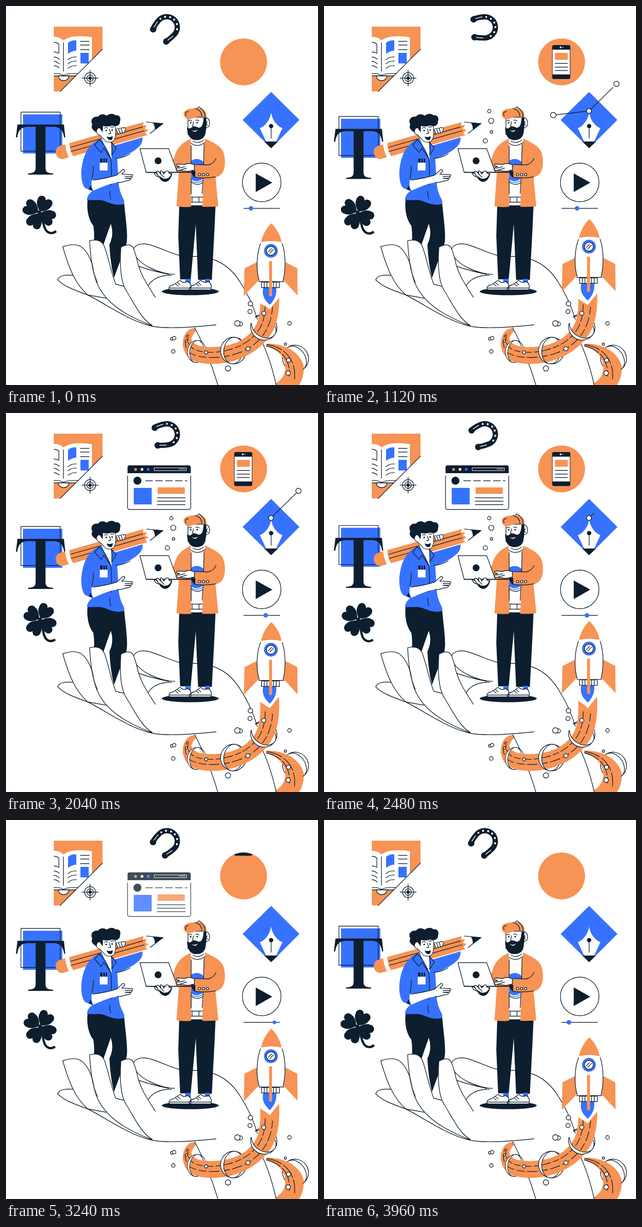
These frames come from a looping animation (679 px wide and 825 px high, 4000 ms). An HTML page:

```html
<!DOCTYPE html>
<html lang="en">
<head>
<meta charset="utf-8">
<title>Creative team</title>
<style>
html,body{margin:0;width:100%;height:100%;overflow:hidden;background:#fff}
svg{display:block;width:679px;height:825px}
.o{fill:#f79354}.b{fill:#3772ff}.n{fill:#0d1e2e}.w{fill:#fff}
.l{fill:none}
.s,.l{stroke:#0d1e2e;stroke-width:1.4;stroke-linecap:round;stroke-linejoin:round}
.r{stroke:#fff;fill:none}
.grow{transform-box:fill-box;transform-origin:center}
</style>
</head>
<body>
<svg viewBox="0 0 679 825">
<defs>
  <clipPath id="disc"><circle cx="517" cy="121.7" r="51"/></clipPath>
  <clipPath id="page"><path d="M104 45H210V94L118 186H104Z"/></clipPath>
  <path id="leaf" d="M0-2C-6-7-16-13-16.500-23A8.500 9 0 0 1 0-30A8.500 9 0 0 1 16.500-23C16-13 6-7 0-2Z"/>
  <path id="band" class="w s" d="M0-29A28 29 0 0 0 0 29A21 29 0 0 1 0-29Z"/>
</defs>

<!-- book -->
<g clip-path="url(#page)">
  <path class="o" d="M104 45H210V94L118 186H104Z"/>
  <path class="w" d="M104 67Q117 67 125 75Q143 61 187 68V152H104Z"/>
  <path class="b" d="M135 80Q143 74 153 75V97Q143 98 135 104ZM162 102H180V125H162Z"/>
  <path class="l" d="M125 80V142M104 79Q111 79 115 83V103Q110 100 104 100M104 111Q111 111 116 116M104 120Q111 121 116 126M104 130Q111 130 116 135M135 117Q142 110 153 111M135 126Q142 119 153 120M135 136Q142 129 153 130M162 77H181M162 85H181M162 95H181M104 147Q117 146 125 151Q133 146 158 147"/>
  <path class="w s" d="M114 152A11.500 10.500 0 0 0 137 152Z"/>
  <path class="l" d="M104 152H156"/>
</g>
<path class="l" d="M210 94L118 186M165.500 157H200.500M183 139.500V174.500"/>
<circle class="l" cx="183" cy="157" r="12"/><circle class="l" cx="183" cy="157" r="7"/><circle class="n" cx="183" cy="157" r="3.500"/>

<!-- horseshoe -->
<g id="shoe">
  <path class="l" style="stroke-width:11.500" d="M327 27C337 24 343 23.500 350 23.500A23 23 0 0 1 350 69.500C343 69.500 337 69 327 67"/>
  <circle class="n" cx="326.500" cy="28" r="7"/><circle class="n" cx="326.500" cy="67" r="7"/>
  <path class="r" stroke-width="1.500" stroke-linecap="round" d="M331 26L345 23.500M331 67.500L345 69.500"/>
  <g class="w"><circle cx="354" cy="24" r="2"/><circle cx="364" cy="28.500" r="2.200"/><circle cx="371" cy="37" r="2.200"/><circle cx="373" cy="47" r="2.200"/><circle cx="370" cy="58" r="2.200"/><circle cx="362" cy="66" r="2.200"/></g>
</g>

<!-- phone -->
<circle class="o" cx="517" cy="121.700" r="51"/>
<g clip-path="url(#disc)"><g id="phone">
  <rect class="n" x="496.500" y="85" width="39.500" height="74" rx="4"/>
  <path class="w" d="M497.500 95H535V149H497.500Z"/>
  <path class="o" d="M502.500 102H530.500V117H502.500Z"/>
  <path class="l" d="M503 125H530M503 133H530M503 140.500H530"/>
  <circle class="w" cx="515" cy="90" r="2"/><circle class="w" cx="520" cy="90" r="1"/>
</g></g>

<!-- pen tool -->
<path class="b" d="M577 187L638.500 248L577 309.500L515 248Z"/>
<path class="w" d="M577 232C574 250 563 262 552.500 266L566 295H588L601.500 266C591 262 580 250 577 232Z"/>
<path class="n" d="M562 295H592L577 309.500Z"/>
<path class="l" d="M577 262V288"/><circle class="n" cx="577" cy="261.500" r="4.700"/>
<path class="l" id="lineL"/><path class="l" id="lineR"/>
<circle class="w s grow" id="knobL" cx="499" cy="237.500" r="6"/>
<circle class="w s grow" id="knobR" cx="636.500" cy="169.500" r="5.800"/>
<circle class="w s grow" id="anchor" cx="576.700" cy="228.500" r="5.200"/>

<!-- player -->
<circle class="w s" cx="556.500" cy="384" r="42"/>
<path class="n" d="M543.500 364.500V405L579.500 384.500Z"/>
<path class="l" d="M517.500 440.500H595.500"/>
<circle class="b grow" id="dot" cy="440.500" r="5"/>

<!-- clover -->
<g id="clover">
  <g class="n" transform="translate(72.500 449.500) rotate(28)"><use href="#leaf"/><use href="#leaf" transform="rotate(90)"/><use href="#leaf" transform="rotate(180)"/><use href="#leaf" transform="rotate(270)"/><circle r="4"/></g>
  <path class="l" style="stroke-width:5;stroke-linecap:butt" d="M73 450C80 464 81 475 84 482C89 496 101 497 109 490"/>
</g>

<!-- letter -->
<g id="letter">
  <path class="b" d="M37 236H122.500V321H37Z"/>
  <path class="l" d="M32.500 231H118V316H32.500Z"/>
  <path class="n" d="M25 258H126L129 286H126.500C124 269 117 263 102 263H86V352C86 361 90 364 102.500 364.500V367H48V364.500C60 364 64.500 361 64.500 352V263H49C34 263 27 269 24.500 286H21.500Z"/>
</g>

<!-- browser -->
<g id="browser">
  <path class="w s" d="M264.500 137V205Q264.500 210 269 210H397Q402 210 402 205V137"/>
  <path class="n" d="M264.500 131V118Q264.500 114 269 114H397Q402 114 402 118V131Z"/>
  <circle class="o" cx="282" cy="122.700" r="3"/><circle class="w" cx="296" cy="122.700" r="3"/><circle class="b" cx="309.500" cy="122.700" r="3"/>
  <path class="r" d="M322.500 119.500H392.500V125.500H322.500ZM376 122H390"/>
  <circle class="n" cx="286" cy="147.300" r="8.700"/>
  <path class="l" d="M304 147.500H394" stroke-dasharray="15 6.500"/>
  <path class="l" d="M329 184.500H390M329 192H390M329 199.500H390"/>
  <path class="b" d="M278 163H317V199H278Z"/><path class="o" d="M330 162H389V176H330Z"/>
</g>
<g class="w s" id="thoughts"><circle class="grow" cx="351" cy="293.500" r="4.700"/><circle class="grow" cx="364.500" cy="274" r="2.800"/><circle class="grow" cx="364" cy="250" r="5.600"/><circle class="grow" cx="359.700" cy="229" r="3.700"/></g>

<!-- trail, rings and arm -->
<use href="#band" transform="translate(630 767) rotate(-35)"/>
<path class="o" d="M566 735C602 734 640 750 648 785Q649 808 638 825H580C603 815 612 797 606 774C601 757 585 745 566 741Z"/>
<path class="l" d="M568 737C602 742 632 765 628 812M567 740C600 748 619 770 617 806" stroke-dasharray="34 5"/>
<use href="#band" transform="translate(630 767) rotate(145)"/>
<path class="o" d="M414 701C393 700 383 719 385 742L402 748C400 728 404 715 416 705Z"/>
<path class="w" d="M410 699Q440 755 461 825H588Q577 775 559 735L545 690L500 640Z"/>
<path class="l" d="M410 699Q440 755 461 825M559 735Q577 775 588 825"/>
<use href="#band" transform="translate(415 752) rotate(188) scale(.72 .83)"/>
<use href="#band" transform="translate(495 750) rotate(188)"/>
<use href="#band" transform="translate(561 699) rotate(125)"/>
<path class="o" d="M553 621L574 643L594 617C596 650 594 687 577 714C550 755 502 778 453 779C407 780 385 765 385 733L403 723Q406 739 433 742C485 745 519 730 539 703C555 681 554 650 553 621Z"/>
<path class="l" stroke-dasharray="19 5 13 6" d="M564 650C564 690 550 716 518 735C480 757 430 758 409 747C396 740 393 725 398 713"/>
<path class="l" stroke-dasharray="16 7 22 6" d="M580 655C578 694 560 726 528 745C490 768 430 771 402 756C390 748 387 730 394 716"/>
<use href="#band" transform="translate(415 752) rotate(8) scale(.72 .83)"/>
<use href="#band" transform="translate(495 750) rotate(8)"/>
<use href="#band" transform="translate(561 699) rotate(-55)"/>

<!-- palm -->
<path class="w" d="M277 530C282 517 299 515 317 521C345 530 365 542 388 545C440 543 478 553 507 597Q534 638 545 690L457 694C400 703 350 704 318 697L178 630L145 590Z"/>
<path class="l" d="M367 584C339 584 281 564 277 530C282 517 299 515 317 521C345 530 365 542 388 545C440 543 478 553 507 597C525 624 538 652 547 682M309 609Q323 586 360 586M287 566Q318 577 354 584"/>
<ellipse class="n" cx="401" cy="621.500" rx="62" ry="8"/>

<!-- back fingers -->
<path class="w s" d="M178 629C145 617 126 610 112.500 596C116 586 130 585 146 586"/>
<path class="w s" d="M198 600C190 570 184 540 165 525C153 517 139 519 123.500 524C131 550 139 572 146 586Q158 611 178 629L240 640Z"/>

<!-- woman -->
<path class="n" d="M178 418C174 448 182 469 190 478Q193 495 191 520H212L228 474Q236 497 225 519Q227 560 235 592L262 518C266 500 261 470 257 428Z"/>
<path class="b" d="M228 306L297 286Q299 300 284 311C268 323 255 328 240 333Z"/>
<g transform="translate(108 322) rotate(-15.800)">
  <path class="o" d="M26-14.500H15C-4-14-4 15 15 15H26Q23 0 26-14.500ZM35-14.500H203L200-8L209-6L202 0L209 5L200 9L204 15H35Q31 0 35-14.500Z"/>
  <path class="w" d="M26-14.500H35Q31 0 35 15H26Q23 0 26-14.500ZM203-14.500L243 0L204 15L200 9L209 5L202 0L209-6L200-8Z"/>
  <path class="l" d="M36-5H198M34 4H199M209-13L243 0L210 13"/>
  <path class="n" d="M222-7.500L243 0L222 8Q225 0 222-7.500Z"/>
</g>
<path class="b" d="M202 291C178 302 167 326 164 359Q163 386 172 396L188 403Q177 410 176 422C190 424 202 420 213 424S240 436 256 431Q259 429 256 421Q245 402 245 380L242 332C249 325 245 310 232 302L214 289Z"/>
<path class="w" d="M207 285L213 300L230 333L229 300L224 284Z"/>
<path class="b s" d="M203 291L193 303L207 319L213 309L228 332Q218 305 203 291ZM229 296L240 309L230 325Q232 307 229 296Z"/>
<path class="l" d="M228 334Q231 355 228 390M226 403Q225 410 228 420M190 348Q190 364 187 377M239 332Q257 330 270 322"/>
<path class="w" d="M204 341H221V358H204ZM187 378C205 378 225 372 243 367L245 384C224 386 210 394 190 402Q184 392 187 378Z"/>
<path class="n" d="M205 332H210V341H205ZM212 332H215V341H212ZM217 332H220V341H217ZM184 391L188 402L180 399Z"/>
<path class="w s" d="M189 379Q220 375 241 368L254 356Q260 356 258 360L252 366L274 367Q278 369 274 371L259 371H273Q276 374 272 375H259L270 376Q272 379 268 380L260 381Q251 385 242 384"/>
<path class="w s" style="stroke-width:1.200" d="M210 260L237 258Q241 280 236 291Q230 299 217 295L213 290L204 281Q194 277 198 267Q203 261 210 270Z"/>
<path class="n" d="M197 275C188 270 184 264 188 258C182 248 190 239 200 241C206 233 216 236 219 239C227 232 236 235 238 238C247 236 251 244 248 251C249 260 239 264 231 260Q222 264 211 261L210 275L204 266Q198 265 197 275Z"/>
<g class="n"><circle cx="218" cy="271" r="1.800"/><circle cx="231" cy="270" r="1.800"/><path d="M219 284Q227 287 232 283Q233 292 227 292Q221 291 219 284Z"/></g>
<path class="l" d="M214 266Q218 263 221 266M228 264Q231 262 234 264M225 268L228 277L223 278"/>
<path class="w s" style="stroke-width:1.200" d="M240 268Q243 265 245 268Q249 264 251 267Q254 262 256 266Q260 263 260 267L258 275Q256 277 254 275Q252 279 249 276Q246 280 243 277Z"/>
<path class="l" d="M245 268L248 276M251 267L253 275"/>

<!-- front fingers -->
<path class="w" d="M182 511Q206 505 214 523C224 550 229 582 240 606L254 610C249 580 247 550 250 525Q270 514 277 527C291 562 284 570 309 610L325 635L330 690L318 697L240 664Q200 620 190 570Z"/>
<path class="l" d="M240 606L256 610M325 634C308 607 296 591 287 561Q283 541 277 527Q270 514 250 525C247 570 250 602 262 620C281 651 296 683 318 695M239 606C229 582 224 550 214 523Q206 505 182 511C184 550 188 577 197 601C215 646 260 674 318 696M178 629C220 650 268 686 318 697C350 704 410 699 457 694"/>

<!-- man -->
<path class="n" d="M377 434H456L454 480L448 596H418L413 475L402 595H379L375 500Z"/>
<path class="b" d="M390 594H402V604H390ZM433 594H444V604H433Z"/>
<path class="w s" d="M355 617Q353 609 364 607L379 597Q386 605 395 600Q405 603 402 618H358ZM399 617Q398 610 410 607L424 597Q430 604 440 600Q449 604 446 618H403Z"/>
<path class="l" d="M356 614H402M400 614H446M373 602L379 607M369 605L375 610M418 602L424 607M414 605L420 610"/>
<path class="w" d="M402 288H434L430 416L427 427H403Z"/>
<ellipse class="b" cx="415" cy="359" rx="23" ry="26"/>
<path class="r" stroke-width="2" d="M398 374Q414 391 432 374"/>
<path class="l" d="M403 383Q416 393 429 384M403 416H428M405 416V427M420 416V427M403 427H428"/>
<path class="o" d="M402 289C382 298 371 310 366 330L358 345L376 364L371 436Q387 439 403 437L403 330ZM432 288C452 297 472 306 475 325C480 354 472 369 456 373L462 436Q444 438 427 437L430 374L412 373Q409 359 412 345L430 346Z"/>
<path class="l" d="M403 304V345M431 301L430 346M412 345L440 346Q452 343 457 332M412 373Q434 376 456 372M403 376V409M429 375L427 408"/>
<g class="w s"><circle cx="421" cy="367" r="2.600"/><circle cx="429.800" cy="367" r="2.600"/><circle cx="438.500" cy="367" r="2.600"/></g>
<path class="w" d="M403 284H433V298Q417 308 403 298Z"/>
<path class="l" d="M403 299Q418 309 433 297M407 294Q418 301 430 292"/>
<path class="w s" d="M396 242H434Q444 245 443 257Q442 265 434 265L432 280H396Z"/>
<path class="n" d="M430 243H436V264L434 278Q430 292 414 292Q395 292 394 264Q400 269 404 264Q412 260 419 265Q429 266 430 243Z"/>
<path class="w" d="M404 270Q411 274 417 269Q413 278 404 270Z"/>
<g class="n"><circle cx="402" cy="254" r="1.800"/><circle cx="416" cy="254" r="1.800"/></g>
<path class="l" d="M398 250Q401 247 404 250M413 249Q416 247 420 250M408 252L406 262L411 263M438 252Q434 257 439 260"/>
<path class="o" d="M388 240C383 227 396 223 411 223C426 219 439 229 436 243Q420 238 405 245Q392 249 388 240Z"/>
<path class="l" d="M392 239Q388 230 397 230M411 223Q426 227 426 240M422 221Q434 229 433 242M417 222Q420 217 423 222"/>

<!-- laptop -->
<path class="n" d="M334 364H362Q358 382 346 383Q337 381 334 374Z"/>
<path class="w s" d="M291.500 310.500H354L373 362H305Z"/>
<circle class="n" cx="331" cy="337" r="7.500"/>
<path class="l" style="stroke-width:2" d="M305 362H403"/>
<path class="w s" d="M370 357Q371 352 378 349L371 348Q370 344 375 344L389 345Q399 340 410 346V357L397 360Z"/>
<path class="l" d="M375 353L389 350M379 357L393 353"/>
<path class="n" d="M403 359L412 359V374Q403 368 403 359Z"/>
<path class="w s" d="M322 364Q326 361 331 369L327 361Q331 357 337 366L336 359Q340 357 343 366L349 359Q355 358 354 363L360 366Q357 377 344 377L327 370Z"/>
<path class="l" d="M331 369L340 375M337 366L344 373"/>

<!-- bubbles -->
<g class="w s">
  <circle cx="532" cy="648" r="5"/><circle cx="531" cy="665" r="4.500"/><circle cx="561" cy="669" r="4.500"/>
  <circle cx="510" cy="692" r="4.500"/><circle cx="503.500" cy="691" r="6"/><circle cx="617" cy="691" r="4"/>
  <circle cx="608" cy="736" r="2.500"/><circle cx="615" cy="771" r="4.500"/><circle cx="614" cy="799" r="5"/>
  <circle cx="526.500" cy="746" r="4.500"/><circle cx="435.500" cy="754" r="3.500"/><circle cx="483" cy="789" r="5.800"/>
  <circle cx="364" cy="752" r="4"/><circle cx="361" cy="724.500" r="3"/><circle cx="366" cy="723" r="3.800"/><circle cx="392.500" cy="729" r="2.500"/>
</g>

<!-- rocket -->
<g id="rocket">
  <path class="w" d="M550 598H604L595 634L574 660L552 646Z"/>
  <path class="o" d="M547 557L519 571L517.500 631L550 597ZM607 557L634 571L634.500 630L604 597Z"/>
  <path class="w" d="M556 512H600C610 540 610 575 603 600H551C543 570 545 540 556 512Z"/>
  <path class="o" d="M577.500 473C589 484 597 499 600 514Q577 509 555 514C558 499 566 484 577.500 473Z"/>
  <path class="l" d="M554 517C545 540 544 575 551 598M601 517C609 540 609 575 603 598M550 600H605"/>
  <circle class="b" cx="576.500" cy="533" r="15"/><circle class="w s" cx="576.500" cy="533" r="9.700"/>
  <path class="l" d="M571 535L578 528M574 538L582 530"/>
  <path class="b" d="M560 613H588C590 629 583 642 574 650.500C563 640 556 630 560 613Z"/>
  <path class="w s" d="M556 601H595V613H556ZM562 601V613M568 601V613M582 601V613M588 601V613"/>
  <path class="o" d="M572.500 555H579V631.500H572.500Z"/>
</g>
</svg>
<script>
const $ = id => document.getElementById(id);
const LOOP = 4000, STEP = 40, PEAK = 2920;

// Progress from 0 to 1 between two times: straight, or eased at both ends.
const linear = (t, from, to) => Math.min(1, Math.max(0, (t - from) / (to - from)));
const ease = (t, from, to) => (1 - Math.cos(Math.PI * linear(t, from, to))) / 2;
const cubic = u => u < 0.5 ? 4 * u ** 3 : 1 - 4 * (1 - u) ** 3;

const move = (id, y) => $(id).setAttribute('transform', `translate(0 ${y})`);
const turn = (id, angle, x, y) => $(id).setAttribute('transform', `rotate(${angle} ${x} ${y})`);
const fade = (id, alpha) => $(id).style.opacity = alpha;
const grow = (el, k) => el.style.transform = `scale(${k})`;

// A control handle reaches out from the anchor, then draws back.
function handle(side, dx, dy, out, back) {
  const reach = ease(out[0], out[1], out[2]) - ease(out[0], back, back + 440);
  $('line' + side).setAttribute('d', reach > 0.01 ? `M576.700 228.500l${dx * reach} ${dy * reach}` : '');
  grow($('knob' + side), ease(reach, 0.15, 0.9) * (1 - ease(out[0], back - 80, back + 260)));
}

function draw(t) {
  move('letter', 8 - 8 * Math.cos(2 * Math.PI * t / LOOP));

  const climb = Math.sin(Math.PI / 2 * linear(t, 0, PEAK)) ** 1.45;
  move('rocket', -21 * (climb - cubic(linear(t, PEAK, LOOP))));
  turn('clover', 6 * (ease(t, 0, PEAK) - cubic(linear(t, PEAK, LOOP))), 73, 468);
  turn('shoe', -47 * (1 - ease(t, 0, 1320) + ease(t, 1320, 3760)), 349.5, 46.5);

  move('phone', 92 * (1 - ease(t, 40, 600) - ease(t, 2680, 3400)));

  $('dot').setAttribute('cx', 533 + (t < 3560 ? 0.0158 * t : 0));
  grow($('dot'), 1 - ease(t, 3120, 3520) + ease(t, 3600, 3920));

  handle('L', -77.7, 9, [t, 240, 640], 1680);
  handle('R', 59.8, -59, [t, 720, 1240], 2160);
  grow($('anchor'), ease(t, 80, 360) - ease(t, 2600, 2880));

  move('browser', 20 * (1 - linear(t, 1240, 1760)));
  fade('browser', linear(t, 1240, 1760) - ease(t, 3120, 3520));

  fade('thoughts', 1 - linear(t, 2680, 3200));
  [...$('thoughts').children].forEach((c, i) => grow(c, ease(t, 320 + i * 130, 640 + i * 130)));
}

const start = performance.now();
function tick() {
  const t = (performance.now() - start) % LOOP;
  draw(Math.floor(t / STEP) * STEP);
  requestAnimationFrame(tick);
}
tick();
</script>
</body>
</html>
```
